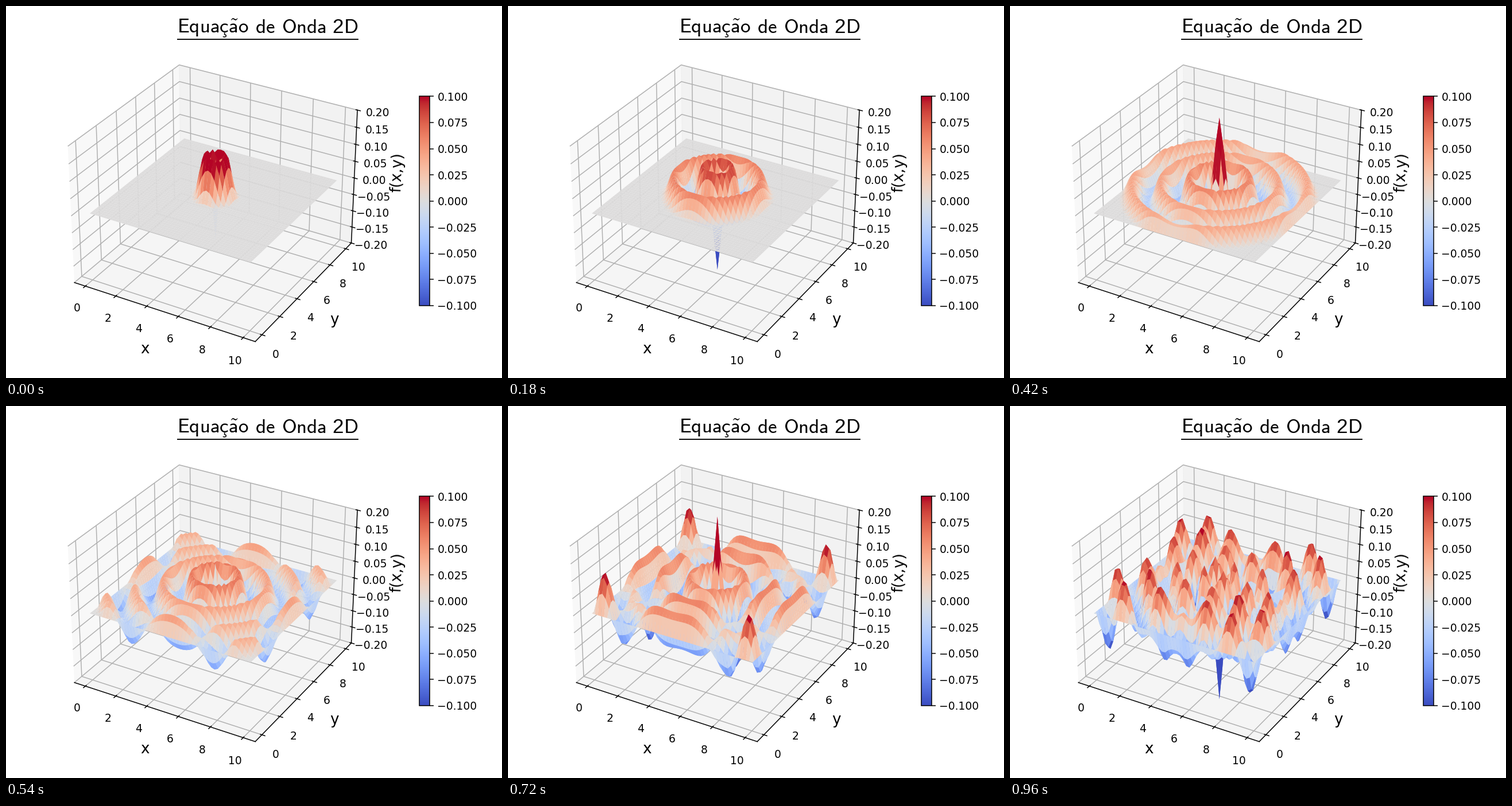
A matplotlib script for the animation above (1.02 s loop, 864 px wide and 648 px high).

```python
import numpy as np
import matplotlib.pyplot as plt
from matplotlib.animation import FuncAnimation
from matplotlib.lines import Line2D

WIDTH, HEIGHT, DPI = 864, 648, 135
FRAMES, INTERVAL = 17, 60

# Membrane with fixed edges, driven at its centre by a sine.
SIDE, POINTS, STRIDE = 10.0, 201, 4
FIRST_STEP, STEPS_PER_FRAME, FRAME_TIME = 36, 18, 0.602
OMEGA, STRENGTH, SOURCE_WIDTH = 4.0, 0.80, 0.085

axis = np.linspace(0, SIDE, POINTS)
X, Y = np.meshgrid(axis, axis)


def simulate():
    """Leapfrog integration; returns one height map per frame."""
    h = axis[1] - axis[0]
    dt = FRAME_TIME / STEPS_PER_FRAME
    r2 = (X - SIDE / 2) ** 2 + (Y - SIDE / 2) ** 2
    source = np.exp(-r2 / (2 * SOURCE_WIDTH ** 2))
    source *= STRENGTH / (2 * np.pi * SOURCE_WIDTH ** 2)

    old, now = np.zeros_like(X), np.zeros_like(X)
    heights = []
    for step in range(FIRST_STEP + STEPS_PER_FRAME * (FRAMES - 1) + 1):
        if step >= FIRST_STEP and (step - FIRST_STEP) % STEPS_PER_FRAME == 0:
            heights.append(now[::STRIDE, ::STRIDE].copy())
        new = np.zeros_like(now)
        laplacian = (now[2:, 1:-1] + now[:-2, 1:-1] + now[1:-1, 2:]
                     + now[1:-1, :-2] - 4 * now[1:-1, 1:-1]) / h ** 2
        force = source[1:-1, 1:-1] * np.sin(OMEGA * step * dt)
        new[1:-1, 1:-1] = (2 * now - old)[1:-1, 1:-1] + dt ** 2 * (laplacian + force)
        old, now = now, new
    return heights


def box(left, top, width, height):
    """Pixel box, measured from the top left, as figure fractions."""
    return [left / WIDTH, 1 - (top + height) / HEIGHT, width / WIDTH, height / HEIGHT]


def stroke(points, width):
    xs, ys = np.array(points).T
    fig.add_artist(Line2D(xs / WIDTH, 1 - ys / HEIGHT, color="black", lw=width))


def title_text(x, text, **style):
    fig.text(x / WIDTH, 1 - 47 / HEIGHT, text, size=18.7, ha="left",
             va="baseline", **style)


heights = simulate()
fig = plt.figure(figsize=(WIDTH / DPI, HEIGHT / DPI), dpi=DPI)

# Title: math sans letters, a plain sans digit, a hand-drawn cedilla, an underline.
for x, word in ((298.5, r"Equac\tilde{a}o"), (434, "de"), (479.5, "Onda"), (587.5, "D")):
    title_text(x, rf"$\mathsf{{{word}}}$", math_fontfamily="cm")
title_text(568.5, "2", family="Liberation Sans")
stroke([(381, 47), (380.5, 49.5), (383, 50.5), (383.5, 52.5), (381.5, 54), (378.5, 53.6)], 0.8)
stroke([(299, 58), (613, 58)], 1.0)

ax = fig.add_axes(box(76.8, 59.2, 560.8, 560.8), projection="3d")
margin = SIDE * (0.05 + 1.1 / 48)
ax.set_xlim(-margin, SIDE + margin)
ax.set_ylim(-margin, SIDE + margin)
ax.set_zlim(-0.2, 0.2)
ax.set_xlabel("x", fontsize=14)
ax.set_ylabel("y", fontsize=14)
ax.set_zlabel("f(x,y)", fontsize=14)


def draw_surface(z):
    return ax.plot_surface(X[::STRIDE, ::STRIDE], Y[::STRIDE, ::STRIDE], z,
                           rstride=1, cstride=1, cmap="coolwarm",
                           vmin=-0.1, vmax=0.1, linewidth=0, antialiased=True)


surface = draw_surface(heights[0])
fig.colorbar(surface, cax=fig.add_axes(box(720, 157.4, 18.2, 364.5)))


def update(frame):
    global surface
    surface.remove()
    surface = draw_surface(heights[frame])
    return [surface]


anim = FuncAnimation(fig, update, frames=FRAMES, init_func=lambda: [],
                     interval=INTERVAL, repeat=True, repeat_delay=0, blit=False)
plt.show()
```
